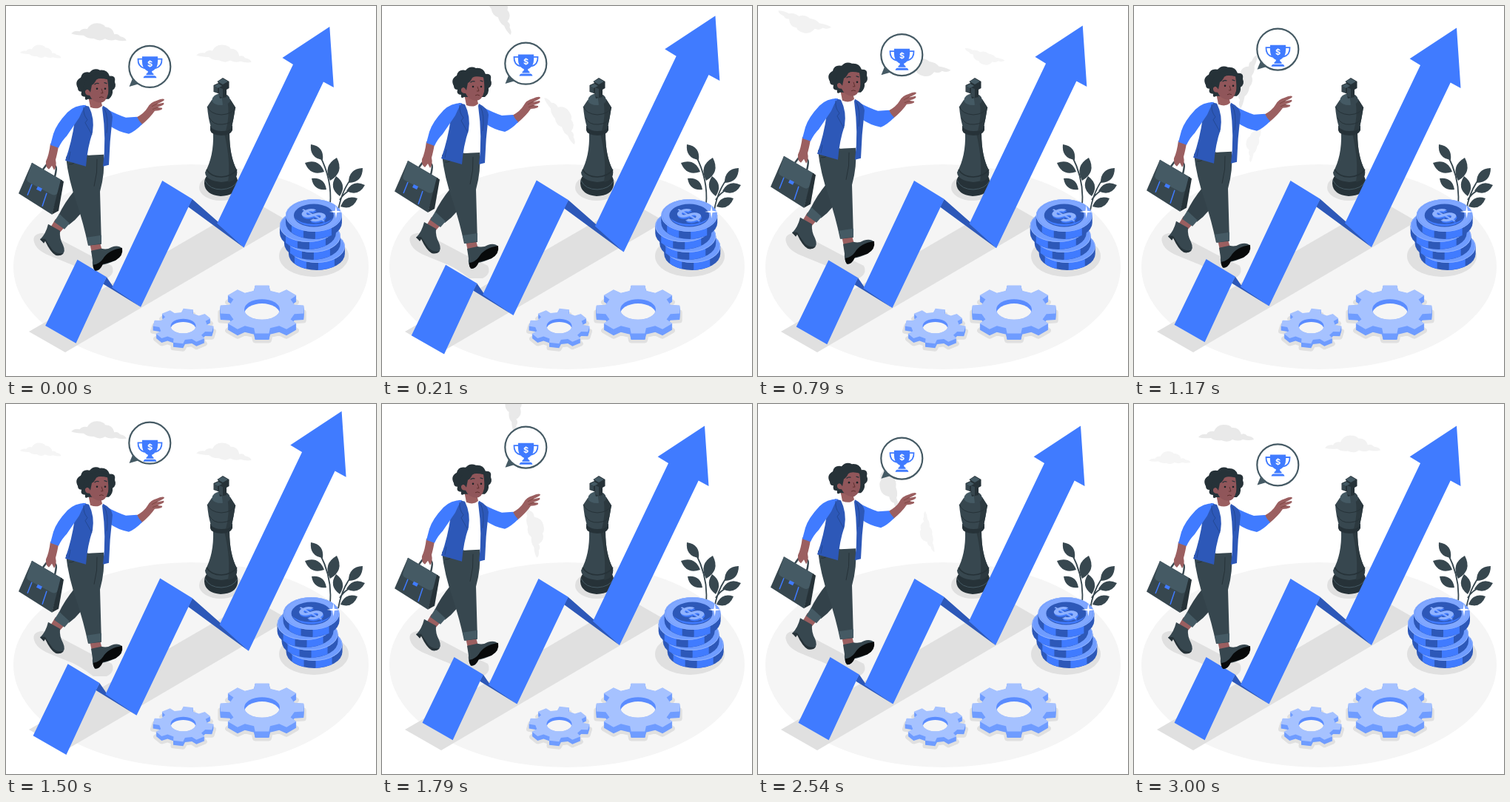
Recreate the animation shown at these times as an HTML page. Size 500 px wide and 500 px high, loop 3040 ms.

```html
<!DOCTYPE html>
<html lang="en">
<head>
<meta charset="utf-8">
<title>Climbing to the goal</title>
<style>
  html, body { margin: 0; width: 100%; height: 100%; overflow: hidden; background: #fff; }
  svg { display: block; width: 100vw; height: 100vh; }
  text { font-family: Inter, Roboto, sans-serif; font-weight: 700; text-anchor: middle; }
</style>
</head>
<body>
<svg viewBox="0 0 500 500">
  <defs>
    <path id="cloud" d="M0 17Q4 12 11 13Q14 8 21 9Q25 0 34 0Q43 0 45 4Q55 3 58 13Q63 11 66 15Q74 16 75 20Q68 22 60 20Q54 23 46 20Q40 25 31 21Q22 22 17 18Q6 19 0 17Z"/>
  </defs>

  <ellipse cx="250" cy="352.500" rx="240" ry="138.500" fill="#f5f5f5"/>
  <g fill="#e0e0e0">
    <path d="M31 440L80 468L382 291L335 264Z"/>
    <path d="M38 319Q35 309 47 307Q62 306 76 317L112 336L143 351Q148 362 136 368L118 368Q98 352 80 346L58 337Q41 330 38 319Z"/>
    <ellipse cx="290" cy="245" rx="29" ry="18"/>
    <ellipse cx="416" cy="338" rx="47" ry="28"/>
  </g>
  <g id="gears"></g>

  <g id="clouds">
    <use href="#cloud" fill="#f5f5f5" transform="translate(20 64) scale(.75)"/>
    <use href="#cloud" fill="#e9e9e9" transform="translate(87 28)"/>
    <use href="#cloud" fill="#f2f2f2" transform="translate(258 42.500)"/>
  </g>

  <g id="king">
    <path fill="#263238" d="M268 240Q268 234 271 230H311Q314 236 313 242Q311 256 290 257Q269 255 268 240Z"/>
    <path fill="none" stroke="#455a64" d="M269 236Q275 248 291 248Q308 247 313 236"/>
    <path fill="#37474f" d="M280 172H302Q302 203 312 222Q314 236 291 238Q270 236 269 225Q281 203 280 172Z"/>
    <path fill="#2c393f" d="M295 172H302Q302 203 312 222Q314 235 300 238Q304 210 295 172Z"/>
    <path fill="none" stroke="#263238" stroke-width="1.500" d="M271 221Q277 231 291 231Q306 230 312 221"/>
    <path fill="#263238" d="M276 162H306V168Q303 175 291 175Q277 174 276 168Z"/>
    <path fill="#37474f" d="M278 127L272 136Q273 151 277 164Q282 169 291 169Q301 169 305 164Q308 150 310 137L303 126Z"/>
    <path fill="#2c393f" d="M299 126H303L310 137Q308 150 305 164Q302 168 297 169Q303 148 299 126Z"/>
    <path fill="none" stroke="#263238" d="M272 136Q276 146 291 147Q306 146 310 137M275 151Q280 161 292 160Q304 159 307 152"/>
    <path fill="#455a64" d="M278 128Q279 119 291 118Q302 119 303 127Q301 134 291 134Q281 134 278 128Z"/>
    <path fill="#37474f" d="M291 118Q302 119 303 127Q301 134 293 134Z"/>
    <path fill="#263238" d="M280.500 107L287 104L285.500 102L293 97L301.500 102V111L298 113V123L289 125L287 118L280.500 116Z"/>
    <path fill="#455a64" d="M286 102L293 98L300 102L293 106ZM281 108L287 105L292 108L286 111Z"/>
    <path fill="#37474f" d="M281 108L286 111V118L281 115ZM288 110L293 112V124L288 122Z"/>
  </g>

  <g id="plant" fill="#37474f">
    <path fill="none" stroke="#37474f" stroke-width="1.800" d="M438 268Q441 235 424 202M449 276Q454 247 470 229M451 262Q456 253 468 247"/>
  </g>
  <g id="coins"></g>

  <g id="arrow">
    <path fill="#2d58b8" d="M136.700 365.400L146 379L182.500 405.500L132 374.500ZM251.500 260.700L287 292L321 326L246 271Z"/>
    <path fill="#407bff" d="M97.500 342L136.700 365.400L95.600 454.200L54.500 430.800ZM211.500 236L251.700 260.700L182.500 405.500L144 379.500ZM436 29.500L441.500 111L427.700 103.500L321 326L285 293.500L387 80L372.600 71.300Z"/>
  </g>

  <g id="woman">
    <!-- briefcase -->
    <path fill="none" stroke="#37474f" stroke-width="2.500" d="M50 221L56 213Q58 211 61 213L67 217Q69 219 66 231"/>
    <path fill="#37474f" d="M35 212L76 236L62 282L17 253.500Z"/>
    <path fill="#455a64" d="M35 212L76 236L69 254Q66 257 62 255L30 238Q27 235 29 231Z"/>
    <path fill="#263238" d="M74 235L78 237.500L71 277L62 282Z"/>
    <path fill="none" stroke="#407bff" stroke-width="1.500" d="M35 241L29 256M55 253L49 271"/>
    <path fill="#407bff" d="M43 244L49 247L47 251L41 248Z"/>
    <!-- back leg -->
    <path fill="#9b5f60" d="M67 288L80 298L73 306L61 298Z"/>
    <path fill="#37474f" d="M57 295L73 304Q72 314 77 323Q81 332 76 336Q68 339 62 332Q57 323 53 316L51 320L46 316Q54 308 57 295Z"/>
    <path fill="#263238" d="M46 315L53 315Q58 323 63 330Q69 336 78 334Q74 339 67 337Q60 333 53 318L51 321Z"/>
    <path fill="#33424a" d="M93 249Q79 266 71 283L85 296Q103 283 114 260Z"/>
    <path fill="#455a64" d="M72 281L86 294L79 302L65 292Z"/>
    <!-- front leg -->
    <path fill="#9b5f60" d="M113 320H127L130 331L116 334Z"/>
    <path fill="#37474f" d="M115 331L129 328Q137 330 143 326Q152 323 157 328Q158 337 148 344Q137 349 130 350Q127 358 120 358Q116 351 117 344Z"/>
    <path fill="#080a0b" d="M157 327Q159 338 148 344Q139 347 131 349Q127 358 121 358Q117 355 118 350Q126 349 131 342Q138 330 157 327Z"/>
    <path fill="#37474f" d="M81 204L132 200Q134 226 127 251L129 322L111 324Q105 295 96 268Q84 234 81 204Z"/>
    <path fill="#455a64" d="M109 313L129 310V321L112 324Z"/>
    <path fill="none" stroke="#263238" d="M123 207Q124 225 119 244M85 214Q92 215 96 208"/>
    <!-- hand, torso -->
    <path fill="#9b5f60" d="M60 186L71 190Q69 201 67 208Q69 217 65 222L62 216L58 221Q53 218 54 210Q58 202 60 186Z"/>
    <path fill="#9b5f60" d="M176 151Q187 145 191 138Q195 130 204 128Q213 124 214 127Q213 129 203 133L213 131Q216 134 204 137L211 138Q213 141 201 142Q195 151 183 161Z"/>
    <path fill="none" stroke="#76403c" stroke-width=".8" d="M197 136L205 132M198 140L206 137"/>
    <path fill="#fff" d="M108 136L130 134L136 152L132 201L111 202Z"/>
    <path fill="#9b5f60" d="M111 122L128 127L130 135Q124 141 114 137Z"/>
    <path fill="#407bff" d="M135 139Q150 147 162 151L177 150Q179 155 184 160Q174 170 166 173Q151 170 140 162Z"/>
    <path fill="#2d58b8" d="M131 135Q143 141 144 150Q140 183 139 215L131 217Q136 181 130 138Z"/>
    <path fill="#2d58b8" d="M104 134L112 136Q120 152 117 171Q110 191 108 217L80 209Q89 184 93 155Z"/>
    <path fill="#407bff" d="M108 134Q93 134 83 144Q68 160 64 173L60 188L71 192Q75 183 82 176L99 151Q103 141 108 134Z"/>
    <path fill="none" stroke="#234894" d="M105 137Q104 147 110 154L107 158L116 174M133 139Q139 150 136 172M87 197L85 208"/>
    <!-- head -->
    <path fill="#263238" d="M97 111Q92 102 101 97Q103 88 113 90Q119 83 127 87Q137 86 140 95Q149 94 147 103Q150 110 144 114Q145 121 139 126H111Q106 129 107 123Q100 123 102 116Q97 116 97 111Z"/>
    <path fill="#90565a" d="M114 104Q119 96 137 99Q139 111 138 119Q135 131 127 131Q117 130 113 121Q106 121 107 115Q110 111 114 115Z"/>
    <path fill="#263238" d="M104 113Q106 97 118 93Q134 89 140 101Q128 95 122 100Q119 106 116 107L114 117Q110 110 104 113Z"/>
    <path fill="none" stroke="#263238" stroke-width="1.300" stroke-linecap="round" d="M120 106Q122 104 125 105M133 104L136 105"/>
    <g fill="#1b2226"><circle cx="123" cy="112" r="1.300"/><circle cx="134" cy="112" r="1.300"/></g>
    <path fill="none" stroke="#5f302e" d="M129 112L131 118L128 118M126 124Q129 122 132 124"/>
  </g>

  <g id="bubble">
    <path fill="#455a64" d="M172 96L166.500 109.500L182 105Z"/>
    <circle cx="194.300" cy="82.300" r="28" fill="#fff" stroke="#455a64" stroke-width="2.200"/>
  </g>
  <g id="trophy">
    <g fill="#407bff">
      <path d="M184 68.500H205Q206 81 202 85Q199 88 197 88.500Q197 90.500 199.500 92V93.500H189.500V92Q192 90.500 192 88.500Q190 88 187 85Q183 81 184 68.500ZM188 94.500H201Q203 95 203.500 97.500H185.500Q186 95 188 94.500Z"/>
      <path fill="none" stroke="#407bff" stroke-width="1.800" d="M184.500 72H178.500Q178 82 187 84.500M204.500 72H210.500Q211 82 202 84.500"/>
    </g>
    <text x="194.500" y="81.800" font-size="11" fill="#fff">$</text>
  </g>
</svg>
<script>
const byId = id => document.getElementById(id);
const FLAT = 0.577;  // isometric squash of a circle

// Ring of trapezoid teeth seen from above at an isometric angle.
function gearPath(cx, cy, radius, teeth, turn) {
  const points = [];
  const step = 2 * Math.PI / teeth;
  for (let i = 0; i < teeth; i++) {
    for (const [offset, reach] of [[-.31, .79], [-.21, 1], [.21, 1], [.31, .79]]) {
      const a = turn + (i + offset) * step;
      points.push((cx + radius * reach * Math.cos(a)).toFixed(1) + ' ' +
                  (cy + radius * reach * Math.sin(a) * FLAT).toFixed(1));
    }
  }
  return 'M' + points.join('L') + 'Z';
}

function gear(name, cx, cy, radius, turn, depth, hole) {
  const d = gearPath(cx, cy, radius, 8, turn);
  const ring = dy => `<ellipse cx="${cx}" cy="${cy + dy}" rx="${hole}" ry="${hole * FLAT}"`;
  let out = `<path d="${d}" transform="translate(0 ${depth + 1})" fill="#e0e0e0" stroke="#e0e0e0" stroke-width="7" stroke-linejoin="round"/>`;
  for (let dy = depth; dy > 0; dy--) {
    out += `<path d="${d}" transform="translate(0 ${dy})" fill="#6f9cff"/>`;
  }
  return out + `<path d="${d}" fill="#a6c2ff"/>` +
    `<clipPath id="${name}">${ring(0)}/></clipPath>${ring(0)} fill="#5a8cff"/>` +
    `<g clip-path="url(#${name})">${ring(depth * .7)} fill="#f5f5f5"/></g>`;
}

function leaf(bx, by, tx, ty) {
  const mx = (bx + tx) / 2, my = (by + ty) / 2;
  const nx = (by - ty) * .48, ny = (tx - bx) * .48;
  return `<path d="M${bx} ${by}Q${mx + nx} ${my + ny} ${tx} ${ty}Q${mx - nx} ${my - ny} ${bx} ${by}Z"/>`;
}

function coin(cx, cy) {
  return `<g transform="translate(${cx} ${cy})">
    <path fill="#2d58b8" d="M-38 0V10A38 22 0 0 0 38 10V0Z"/>
    <path fill="#407bff" d="M-30 10V23Q-22 29 -14 30V18ZM2 20V32Q14 31 24 27V15Z"/>
    <ellipse rx="38" ry="22" fill="#6f9cff"/>
    <ellipse rx="37.500" ry="21.500" fill="none" stroke="#8fb2ff"/></g>`;
}

byId('gears').innerHTML =
  gear('bigHole', 346, 410, 57, 0, 8.5, 24) +
  gear('smallHole', 239.5, 432.5, 41, -1.4, 6, 17);

byId('plant').innerHTML += [
  [428, 208, 412, 187], [430, 224, 404, 212], [433, 248, 413, 233], [438, 236, 447, 205],
  [451, 257, 446, 230], [463, 239, 482, 219], [460, 250, 485, 242], [452, 271, 475, 260]
].map(p => leaf(...p)).join('');

byId('coins').innerHTML =
  [[420, 325], [414, 311], [408, 297], [416, 283]].map(p => coin(...p)).join('') +
  `<ellipse cx="416" cy="283" rx="36" ry="20.500" fill="#80a7ff"/>
   <ellipse cx="416" cy="283" rx="27" ry="15.500" fill="#2d58b8"/>
   <path fill="#407bff" d="M390 286A27 15.500 0 0 0 442 286A28 14 0 0 1 390 286Z"/>
   <g transform="translate(416 283) scale(1.080 .58) rotate(-45)" font-size="41">
     <text y="17" x="-2" fill="#407bff">$</text><text y="14" fill="#8fb2ff">$</text></g>
   <path fill="#fff" d="M446 269L447.200 276.800L456 278L447.200 279.200L446 287L444.800 279.200L437 278L444.800 276.800Z"/>`;

// Linear value between keyframes [percent, value].
function track(keys, percent) {
  const i = Math.max(1, keys.findIndex(k => k[0] >= percent));
  const [p0, v0] = keys[i - 1], [p1, v1] = keys[i];
  return v0 + (v1 - v0) * (percent - p0) / (p1 - p0);
}

const BEAT = [[0, 1], [10, 1.1], [30, 1], [40, 1], [50, 1.1], [60, 1], [100, 1]];
const SHAKE = [0, -1, 2, -4, 4, -4, 4, -4, 2, -1, 0].map((x, i) => [i * 10, x]);
const LOOP = 3040, CYCLE = 3000, HALF = 1500, STEP = 1000 / 24;

const triangle = (time, period) => 1 - Math.abs(1 - 2 * (time % period) / period);
const move = (id, value) => byId(id).setAttribute('transform', value);
const lift = (id, height, time, period) =>
  move(id, `translate(0 ${-height * triangle(time, period)})`);

function draw(ms) {
  // 24 pictures per second, each showing the middle of its interval
  const time = Math.min((Math.floor((ms + 3) / STEP) + .5) * STEP, CYCLE);
  const percent = time / CYCLE * 100;
  move('clouds', `rotate(${time % HALF / HALF * 360} 176.500 54.500)`);
  lift('woman', 10, time, HALF);
  lift('bubble', 30, time, CYCLE);
  lift('trophy', 20, time, CYCLE);
  move('coins', `translate(${track(SHAKE, percent)} 0)`);
  move('arrow', `translate(247 242) scale(${track(BEAT, percent)}) translate(-247 -242)`);
}

const start = performance.now();
function tick() {
  draw((performance.now() - start) % LOOP);
  requestAnimationFrame(tick);
}
draw(0);
requestAnimationFrame(tick);
</script>
</body>
</html>
```
